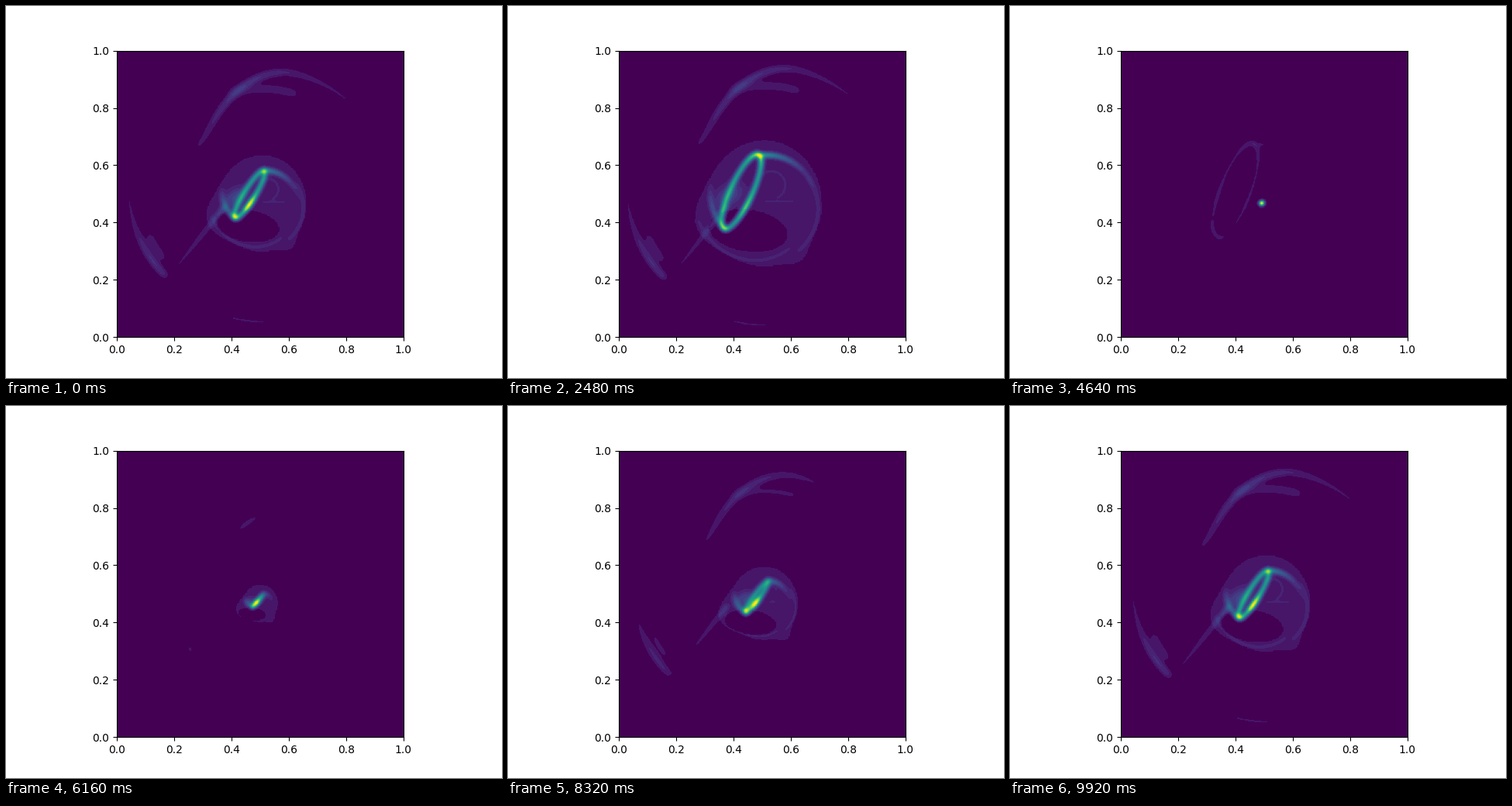
A matplotlib script for the animation above (10000 ms loop, 640 by 480 pixels).

```python
import numpy as np
import matplotlib.pyplot as plt
from matplotlib.animation import FuncAnimation
from matplotlib.colors import ListedColormap

FRAMES, INTERVAL = 125, 80
N = 256
BIRTH = 4.2                      # moment the new flare starts, in seconds
CENTRE = 330.5 + 255j            # middle of the expanding shell, in pixels

# Pixel coordinates of the image cells, y pointing down
GX = 143.2 + 369.6 * (np.arange(N) + 0.5) / N
GY = 57.6 + 369.6 * (np.arange(N) + 0.5) / N
GRID = GX[None, :] + 1j * GY[:, None]

S = np.linspace(0, 1, 70)        # position along a stroke


def bump(x, middle, width):
    return np.exp(-((x - middle) / width) ** 2)


def ray(angle, radius):
    """Complex point from an angle in degrees, y pointing up."""
    return radius * np.exp(1j * np.radians(angle))


def line(start, stop):
    return start + (stop - start) * S


def stroke(path, glow, width):
    """Glowing line with a Gaussian profile along complex pixel points."""
    weight = glow * np.abs(np.gradient(path)) / (width * np.sqrt(2 * np.pi))
    gx = np.exp(-0.5 * ((GX - path.real[:, None]) / width) ** 2)
    gy = np.exp(-0.5 * ((GY - path.imag[:, None]) / width) ** 2)
    return gy.T @ (weight[:, None] * gx)


def s_curve(put, f, r, width):
    """Bright S: a slim tilted loop, a hook on top and a lobe on the left."""
    top_angle, tip_angle = 80 + 14 * f, 201 + 14 * f
    top_radius, tip_radius = 0.63 + 0.16 * f, 0.58 + 0.18 * f
    top, tip = ray(top_angle, top_radius), ray(tip_angle, tip_radius)
    axis = (top - tip) / 2
    side = -1j * axis / abs(axis)

    phi = 2 * np.pi * S
    middle = (top + tip) / 2 + (0.05 - 0.09 * f) * side
    half = max(0.03, 0.06 + 0.12 * f)
    loop = middle + axis * np.cos(phi) + half * side * np.sin(phi)
    glow = (0.35 + 0.1 * f
            + (0.35 * f - 0.15) * bump(np.cos(phi), 1, 0.2)
            + (0.35 - 0.3 * f) * bump(np.cos(phi), -1, 0.15)
            + (0.65 - 0.45 * f) * bump(phi, 1.9, 0.35))
    field = stroke(put(loop), glow, width)

    hook = ray(line(top_angle, top_angle - 95),
               line(top_radius, 0.74 + 0.13 * f))
    field += stroke(put(hook), (0.25 + 0.2 * f) * (1 - S) ** 1.8, width)
    lobe = ray(line(155, tip_angle), line(0.95, tip_radius))
    field += stroke(put(lobe), 0.28 * S, width)
    field += stroke(put(line(-0.75, -0.4 + 0.25j)), 0.14, 1.5 + 0.1 * r)
    return field / field.max()


def shell(centre, r, grown):
    """Flat faint disc with a lobe, a corner and a dark cavity."""
    spot = np.conj(GRID - centre)
    angle = np.angle(spot, deg=True) % 360
    oval = r / np.hypot(np.cos(np.radians(angle)) / 0.955,
                        np.sin(np.radians(angle)) / 1.04)
    edge = oval + grown * (17 * bump(angle, 198, 28)
                           + 9 * bump(angle, 303, 13))
    level = 0.05 * min(1, r / 25) * (np.abs(spot) < edge)

    offset = grown * (-13 - 10j) - r * (0.1 + 0.32j)
    hole = (spot - offset) * ray(8, 1)
    inside = np.hypot(hole.real / (8 * grown + 0.55 * r),
                      hole.imag / (0.34 * r)) < 1
    return np.where(inside, 0, level)


def filaments(put):
    """Thin faint lines inside the shell."""
    rim = ray(line(30, -55), line(0.84, 0.97))
    band = ray(line(195, 300), line(1.12, 0.85))
    curl = 0.12 + 0.3j + ray(line(130, -70), 0.23)
    return (stroke(put(rim), 0.04, 2.6) + stroke(put(band), 0.04, 2.2)
            + stroke(put(curl), 0.035, 2)
            + stroke(put(line(0.03j, 0.5 + 0.03j)), 0.035, 1.6))


def outer_arcs(scale):
    """Lensed images far outside the shell."""
    def arc(start, stop, radius, glow, width):
        path = CENTRE + scale * np.conj(ray(line(start, stop), radius))
        return stroke(path, glow, width)

    top = line(45, 139)
    t = np.clip((top - 75) / 64, 0, 1)
    left = line(168, 217)
    field = arc(45, 139, 173 - 62 * t * t * (3 - 2 * t),
                0.036 + 0.09 * bump(top, 100, 24), 3.8)
    field += arc(106, 72, 148, 0.055, 5.5)
    field += arc(168, 217, line(176, 156),
                 0.036 + 0.08 * bump(left, 208, 14), 3.8)
    field += arc(195, 210, line(152, 146), 0.055, 5)
    field += arc(255, 271, 153, 0.045, 1.6)
    field += arc(308, 313, 186.5, 0.037, 1.4)
    tail = line(283 + 258j, 214 + 345j)
    return field + stroke(tail, 0.036 + 0.09 * (1 - S) ** 2, 3)


def flare(age):
    """Normalised brightness of one flare at the given age."""
    r = 12.4 * age - 0.359 * age**2
    grown = min(1, r / 38)
    centre = CENTRE - 6 * (1 - grown)
    f = np.clip((age - 3.4) / 4.88, -0.4, 1.3)

    def put(points, size=r):
        return centre + size * np.conj(points)

    tight = r * min(1, 0.3 + r / 30)
    field = s_curve(lambda z: put(z, tight), f, r, 2.2 + 0.6 * grown)
    gain = 1.1 * np.sin(np.pi / 2 * age / 7) ** 1.7
    field += shell(centre, r, grown) + gain * filaments(put)
    if age > 1.2:
        reach = 156.5 + 1.9 * age - 40 * np.exp((2.04 - age) / 0.45)
        field += gain * outer_arcs(max(reach, 60) / 168)
    return field


def brightness(t):
    age = t - BIRTH
    if age <= 0.02:
        return flare(t + 10 - BIRTH)
    if age > 1.6:
        return flare(age)
    # The fresh flash outshines the remains of the previous flare
    peak = max(1, 10 * (1 - np.exp(-age / 0.12)) + 6 * age)
    return flare(age) + flare(t + 10 - BIRTH) / peak


# Viridis with visible steps in the dark end
ramp = np.linspace(0, 1, 520)
step = np.floor(ramp * 26)
ramp = np.where(ramp < 0.25, (step + 0.6 * (step > 0)) / 26, ramp)
cmap = ListedColormap(plt.get_cmap("viridis")(ramp))

fig, ax = plt.subplots(figsize=(6.4, 4.8), dpi=100)
image = ax.imshow(np.zeros((N, N)), cmap=cmap, vmin=0, vmax=1,
                  extent=(0, 1, 0, 1))


def update(frame):
    t = frame * 10 / (FRAMES - 1)
    image.set_data(np.clip(brightness(t), 0, 1))
    return (image,)


anim = FuncAnimation(fig, update, frames=FRAMES, interval=INTERVAL,
                     repeat=True, repeat_delay=0)
plt.show()
```
